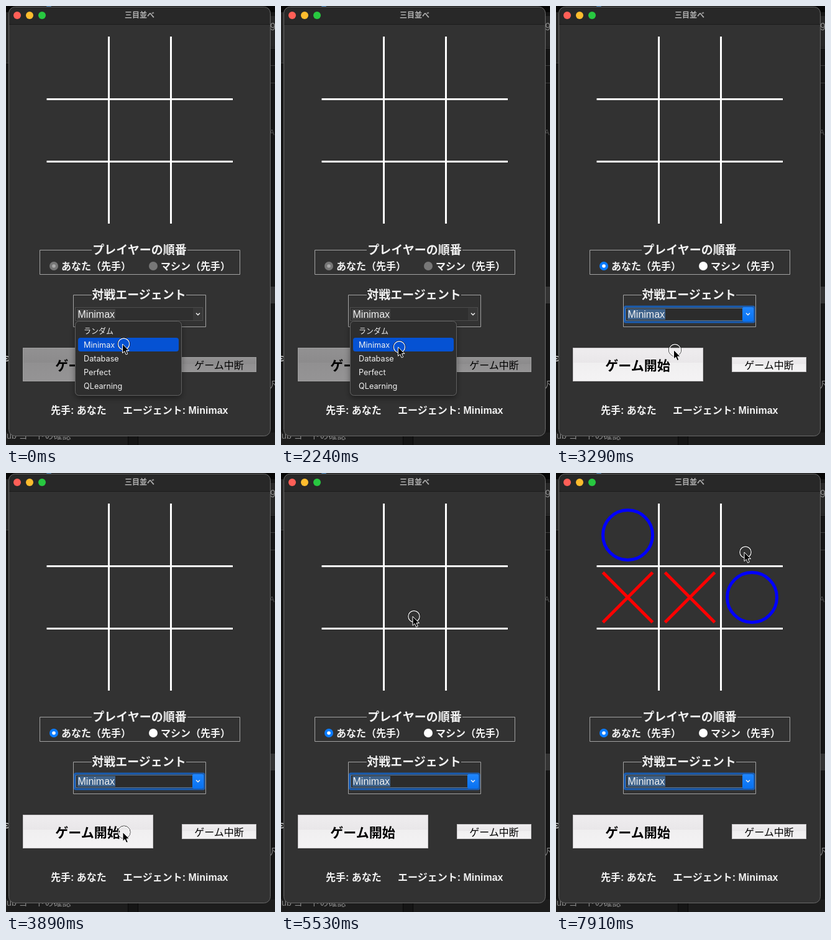
Write an HTML page that moves like this. It is 433 by 704 pixels and loops after 8000 ms.

```html
<!DOCTYPE html>
<html lang="ja">
<head>
<meta charset="utf-8">
<title>三目並べ</title>
<style>
html, body { margin: 0; width: 100%; height: 100%; overflow: hidden; background: #111; }
svg { display: block; width: 433px; height: 704px; }
text { font: 700 16px "Liberation Sans", "Noto Sans CJK JP", "Noto Sans CJK", sans-serif; fill: #f2f2f2; }
.mid { text-anchor: middle; }
.head { font-size: 19px; }
.plain { font-weight: 400; }
.back text { font-weight: 400; fill: #8a8a8a; }
.frame { fill: none; stroke: #a2a2a2; }
#menu text { font: 400 12.7px Inter, "Noto Sans CJK JP", "Noto Sans CJK", sans-serif; fill: #f0f0f0; }
#menu .kana { font-size: 12px; }
.button text { fill: #000; }
.button rect { stroke: #c9c7c9; fill: url(#live); }
.off .button rect { stroke: #a0a0a0; fill: url(#idle); }
.pressed #start rect { fill: #c6c6c6; }
.off .on-only, svg:not(.off) .off-only { display: none; }
.radio { fill: #fff; }
.radio.picked { fill: #0a7bff; }
.off .radio { fill: #777; }
.dot { fill: #fff; }
.off .dot { fill: #a9a9a9; }
.x { stroke: #f00; }
.o { stroke: #00f; }
.x, .o { fill: none; stroke-width: 5; }
</style>
</head>
<body>
<svg id="stage" viewBox="0 0 433 704">
  <defs>
    <linearGradient id="live" x2="0" y2="1">
      <stop offset="0" stop-color="#efedef"/><stop offset=".44" stop-color="#e9e7e9"/>
      <stop offset=".44" stop-color="#f0eff0"/><stop offset="1" stop-color="#f4f3f4"/>
    </linearGradient>
    <linearGradient id="idle" x2="0" y2="1">
      <stop offset="0" stop-color="#929192"/><stop offset=".44" stop-color="#8c8b8c"/>
      <stop offset=".44" stop-color="#919091"/><stop offset="1" stop-color="#959495"/>
    </linearGradient>
    <linearGradient id="blue" x2="0" y2="1">
      <stop offset="0" stop-color="#1f86ff"/><stop offset="1" stop-color="#0871f0"/>
    </linearGradient>
    <filter id="shadow" x="-20%" y="-20%" width="140%" height="150%">
      <feDropShadow dx="0" dy="4" stdDeviation="5" flood-opacity=".4"/>
    </filter>
  </defs>

  <g class="back">
    <rect width="433" height="704" fill="#151515"/>
    <rect width="433" height="10" fill="#060606"/>
    <circle cx="69" cy="-1" r="4" fill="#2a6ca8"/>
    <path d="M0 10H5V91H0ZM426 16H433V66H426Z" fill="#262626"/>
    <path d="M0 91.5H5M426 67.5H433M426 95.5H433M426 123.5H433" stroke="#3c3c3c"/>
    <path d="M426 450H433V477H426Z" fill="#333"/>
    <path d="M0 684H196V704H0ZM213 684H433V704H213Z" fill="#1d1d1d"/>
    <path d="M196.5 684V704M212.5 684V704" stroke="#080808"/>
    <text x="425" y="39" font-size="14">9</text>
    <text x="424" y="207" style="font-size:12px;fill:#555">A</text>
    <text x="425" y="612" style="font-size:14px">凡</text>
    <text x="-3" y="570" style="font-weight:700;fill:#ccc">ε</text>
    <text x="-2" y="694" style="font-size:14px">lub コードの確認</text>
  </g>

  <rect x="4.5" y="1.5" width="421" height="688" rx="10" fill="#323232"/>
  <path d="M5 29V11.500A10 10 0 0 1 14.500 2H415.500A10 10 0 0 1 425 11.500V29Z" fill="#282828"/>
  <path d="M5 29.500H425" stroke="#1b1b1b"/>
  <rect x="4.500" y="1.500" width="421" height="688" rx="10" fill="none" stroke="#6a6a6a"/>
  <circle cx="18" cy="15" r="6" fill="#ff5f57"/>
  <circle cx="38" cy="15" r="6" fill="#febc2e"/>
  <circle cx="58" cy="15" r="6" fill="#28c840"/>
  <text class="mid" x="215" y="19" style="font-size:12px;fill:#b2b2b2">三目並べ</text>

  <path d="M165.500 49V349M265.500 49V349M65.500 149.500H365M65.500 249.500H365" stroke="#fff" stroke-width="3"/>
  <g id="marks"></g>

  <path class="frame" d="M138 391.500H54.500V430.500H376.500V391.500H292"/>
  <text class="mid head" x="215" y="397.500">プレイヤーの順番</text>
  <circle class="radio picked" cx="77" cy="417" r="7"/>
  <circle class="dot" cx="77" cy="417" r="2.800"/>
  <circle class="radio" cx="237" cy="417" r="7"/>
  <text x="89" y="423">あなた（先手）</text>
  <text x="249" y="423">マシン（先手）</text>

  <path class="frame" d="M138 463.500H108.500V514.500H321.500V463.500H290"/>
  <text class="mid head" x="214" y="469.500">対戦エージェント</text>
  <g class="off-only">
    <rect x="111.500" y="483.500" width="205" height="21" fill="#2f2f2f" stroke="#4c4c4c"/>
    <rect x="114" y="486" width="62" height="17" fill="#434343"/>
    <rect x="301" y="484" width="15" height="20" fill="#383838"/>
  </g>
  <g class="on-only">
    <rect x="110.500" y="482" width="208.500" height="25" rx="2" fill="#2c2c2c" stroke="#1a5db2" stroke-width="3"/>
    <rect x="112.500" y="484.500" width="188" height="20" fill="none" stroke="#5e7894"/>
    <rect x="115" y="486" width="61" height="17" fill="#3f638b"/>
    <rect x="300" y="483" width="18" height="23" rx="2" fill="url(#blue)"/>
  </g>
  <text class="plain" x="115.500" y="500">Minimax</text>
  <path d="M306 492.500L309 495.500L312 492.500" fill="none" stroke="#eee" stroke-width="1.500"/>

  <g class="button" id="start">
    <rect x="27.500" y="548.500" width="209" height="53"/>
    <text class="mid" x="131.500" y="584" style="font-size:21px">ゲーム開始</text>
  </g>
  <g class="button">
    <rect x="283.500" y="563.500" width="119" height="23"/>
    <text class="mid plain" x="343" y="581.500">ゲーム中断</text>
  </g>

  <text x="72" y="654">先手: あなた</text>
  <text x="188" y="654">エージェント: Minimax</text>

  <g id="menu">
    <rect x="111.500" y="505.500" width="171" height="119" rx="6" fill="#2f2f2f" stroke="#606060" filter="url(#shadow)"/>
    <rect id="pick" x="116" y="532" width="162" height="22" rx="4" fill="#0552d3"/>
    <text class="kana" x="125" y="525.500">ランダム</text>
    <text x="125" y="547.700">Minimax</text>
    <text x="125" y="569.700">Database</text>
    <text x="125" y="591.700">Perfect</text>
    <text x="125" y="613.700">QLearning</text>
  </g>

  <g id="cursor">
    <circle r="10" fill="none" stroke="#000"/>
    <circle r="9.200" fill="none" stroke="#fff" stroke-width="1.200"/>
    <path d="M-2 0V14.500L1.300 11.500L3.700 17L6.300 15.900L4 10.600H8.500Z" fill="#000" stroke="#fff"/>
  </g>
</svg>
<script>
const LOOP = 8000, STEP = 150;
const $ = id => document.getElementById(id);
const stage = $('stage'), menu = $('menu'), pick = $('pick'), cursor = $('cursor');

// Cursor moves: start time, number of steps, end point
const moves = [
  [300, 6, 186, 558],
  [2090, 3, 192, 543],
  [3140, 6, 190, 576],
  [4780, 6, 214, 230],
  [6270, 2, 127, 218],
  [7460, 4, 305, 127]
];

// Marks: time, shape, column, row
const marks = [
  [5820, 'x', 1, 1],
  [5820, 'o', 0, 0],
  [6710, 'x', 0, 1],
  [6860, 'o', 2, 1]
].map(([time, kind, col, row]) => {
  const path = document.createElementNS('http://www.w3.org/2000/svg', 'path');
  path.setAttribute('class', kind);
  path.setAttribute('transform', `translate(${115.5 + 100 * col} ${99.5 + 100 * row})`);
  path.setAttribute('d', kind === 'x'
    ? 'M-40-40L40 40M40-40L-40 40'
    : 'M-40 0A40 40 0 1 1 40 0A40 40 0 1 1-40 0Z');
  $('marks').append(path);
  return { time, path };
});

const ease = p => p * p * (3 - 2 * p);

function cursorAt(t) {
  let x = 189.5, y = 542;
  for (const [start, steps, toX, toY] of moves) {
    if (t < start) break;
    const p = ease(Math.min(1, (Math.floor((t - start) / STEP) + 1) / steps));
    x += (toX - x) * p;
    y += (toY - y) * p;
  }
  return [x, y];
}

function draw(now) {
  const t = now % LOOP;
  const [x, y] = cursorAt(t);
  cursor.setAttribute('transform', `translate(${x} ${y})`);
  pick.setAttribute('y', y >= 554 ? 554 : 532);
  menu.setAttribute('opacity', t < 2990 ? 1 : t < 3140 ? 0.15 : 0);
  stage.classList.toggle('off', t < 3140);
  stage.classList.toggle('pressed', t >= 4330 && t < 4480);
  for (const m of marks) m.path.style.display = t >= m.time ? '' : 'none';
  requestAnimationFrame(draw);
}
draw(0);
</script>
</body>
</html>
```
